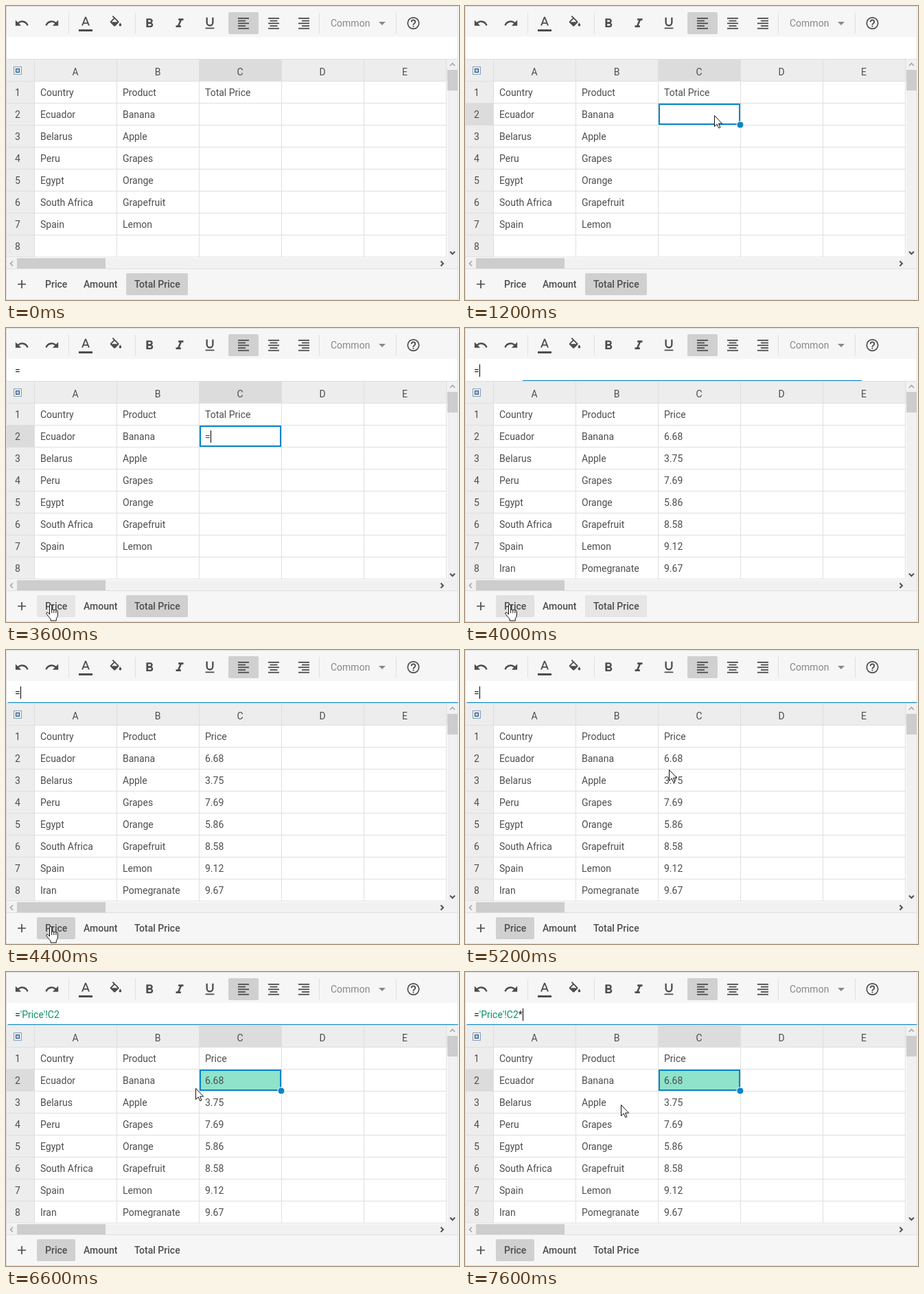
Recreate the animation shown at these times as an HTML page. Size 660 by 428 pixels, loop 8 s.

```html
<!DOCTYPE html>
<html lang="en">
<head>
<meta charset="utf-8">
<title>Spreadsheet cross reference</title>
<style>
  html, body { margin: 0; width: 660px; height: 428px; overflow: hidden; background: #fff; }
  svg { display: block; font: 14px Roboto, sans-serif; fill: #4d4d4d; white-space: pre; }
  .mid { text-anchor: middle; }
  .tab { font-weight: 500; }
</style>
</head>
<body>
<svg id="stage" width="660" height="428" viewBox="0 0 660 428"></svg>
<script>
const LOOP = 8000, STEP = 200;
const BLUE = '#0a85c7', LINE = '#dfdfdf', BAR = '#f6f6f6', HEAD = '#ededed', ACTIVE = '#d0d0d0', HOVER = '#e6e6e6';
const stage = document.getElementById('stage');

const rect = (x, y, w, h, fill, extra = '') => `<rect x="${x}" y="${y}" width="${w}" height="${h}" fill="${fill}" ${extra}/>`;
const text = (x, y, s, extra = '') => `<text x="${x}" y="${y}" ${extra}>${s}</text>`;
const stroke = (d, color, width = 2) => `<path d="${d}" fill="none" stroke="${color}" stroke-width="${width}"/>`;
const icon = (cx, cy, d) => `<path transform="translate(${cx - 11} ${cy - 11}) scale(.917)" d="${d}"/>`;

const undo = 'M12.5 8C9.85 8 7.45 9 5.6 10.6L2 7V16H11L7.38 12.38C8.77 11.22 10.54 10.5 12.5 10.5C16.04 10.5 19.05 12.81 20.1 16L22.47 15.22C21.08 11.03 17.15 8 12.5 8Z';
const letterA = 'M9.62 12L12 5.67L14.37 12M11 3L5.5 17H7.75L8.87 14H15.12L16.25 17H18.5L13 3Z';
const bucket = 'M19 11.5C19 11.5 17 13.67 17 15A2 2 0 0 0 21 15C21 13.67 19 11.5 19 11.5M5.21 10L10 5.21L14.79 10M16.56 8.94L7.62 0L6.21 1.41L8.59 3.79L3.44 8.94Q2.4 10 3.44 11.06L8.94 16.56Q10 17.4 11.06 16.56L16.56 11.06Q17.6 10 16.56 8.94Z';
const bold = 'M13.5 15.5H10V12.5H13.5A1.5 1.5 0 0 1 13.5 15.5M10 6.5H13A1.5 1.5 0 0 1 13 9.5H10M15.6 10.79C16.57 10.11 17.25 9 17.25 8C17.25 5.74 15.5 4 13.25 4H7V18H14.04C16.14 18 17.75 16.3 17.75 14.21C17.75 12.69 16.89 11.39 15.6 10.79Z';
const italic = 'M10 4V7H12.21L8.79 15H6V18H14V15H11.79L15.21 7H18V4Z';
const underline = 'M5 21H19V19H5ZM12 17A6 6 0 0 0 18 11V3H15.5V11A3.5 3.5 0 0 1 8.5 11V3H6V11A6 6 0 0 0 12 17Z';
const help = 'M11 18H13V16H11ZM12 6A4 4 0 0 0 8 10H10A2 2 0 0 1 14 10C14 12 11 11.75 11 15H13C13 12.75 16 12.5 16 10A4 4 0 0 0 12 6Z';
const arrow = 'M.5 .5V16.5L4.2 13L6.8 18.7L9 17.7L6.6 12.2H11.6Z';
const hand = 'M5.5 15V2.2a1.6 1.6 0 0 1 3.2 0V9q0-1.4 1.5-1.4t1.6 1.6q.1-1.2 1.5-1.2t1.6 1.7q.2-1 1.2-1t1.2 1.6V16q0 3-2 5.2V24H7V21.5Q4.5 19 1 14.2Q.2 12.6 1.7 12T5.5 15Z';

const countries = ['Country', 'Ecuador', 'Belarus', 'Peru', 'Egypt', 'South Africa', 'Spain', 'Iran'];
const products = ['Product', 'Banana', 'Apple', 'Grapes', 'Orange', 'Grapefruit', 'Lemon', 'Pomegranate'];
const prices = ['Price', '6.68', '3.75', '7.69', '5.86', '8.58', '9.12', '9.67'];

// Pointer path: time, x, y
const path = [
  [200, 300, 334], [400, 372, 262], [600, 369, 185], [800, 363, 159], [2400, 363, 159],
  [2800, 300, 230], [3200, 100, 380], [3400, 65, 402], [4400, 65, 402], [4600, 110, 331],
  [4800, 190, 265], [5200, 297, 174], [5400, 307, 163], [5800, 312, 151], [6200, 312, 151],
  [7000, 240, 187], [7400, 227, 193], [LOOP, 227, 193]
];

function pointer(t) {
  if (t < path[0][0]) return '';
  const i = path.findIndex(p => p[0] > t);
  const [t0, x0, y0] = path[i - 1], [t1, x1, y1] = path[i];
  const k = (t - t0) / (t1 - t0);
  const overTab = t >= 3400 && t <= 4400;
  const x = Math.round(x0 + (x1 - x0) * k) - (overTab ? 7 : 0), y = Math.round(y0 + (y1 - y0) * k);
  return `<path transform="translate(${x} ${y})" d="${overTab ? hand : arrow}" fill="#fff" stroke="#111"/>`
    + (overTab ? `<g transform="translate(${x} ${y})">${stroke('M8.7 9V13M11.8 9V13M14.9 10V13', '#111', 1)}</g>` : '');
}

const caret = (x, y, t, since) => (t - since) % 1000 < 500 ? rect(x, y, 1, 18, '#000') : '';

function toolbar() {
  let s = rect(0, 0, 659, 45, BAR) + rect(324, 9, 44, 32, ACTIVE, 'rx="2"');
  for (const x of [91, 188, 456, 568]) s += rect(x, 10, 1, 30, LINE);
  s += icon(23, 25, undo) + `<g transform="matrix(-1 0 0 1 90 0)">${icon(23, 25, undo)}</g>`;
  s += icon(116, 24, letterA) + rect(106, 34, 20, 3, '#4d4d4d') + icon(160, 25, bucket);
  s += icon(209, 25.5, bold) + icon(253, 25.5, italic) + icon(297, 25, underline);
  [0, .5, 1].forEach((side, n) => {
    for (let i = 0; i < 5; i++) {
      const w = i % 2 ? 11 : 16;
      s += rect(338 + n * 44 + (16 - w) * side, 17 + i * 3.7, w, 1.8, '#4d4d4d');
    }
  });
  s += text(473, 30, 'Common', 'fill="#888"') + '<path d="M543 23h10l-5 5z" fill="#888"/>';
  return s + '<circle cx="593.5" cy="25" r="8.2" fill="none" stroke="#4d4d4d" stroke-width="1.7"/>' + icon(593.5, 25, help);
}

function grid(onPrice, colSelected, rowSelected) {
  let s = rect(1, 78, 642, 31, HEAD) + rect(1, 109, 40, 257, HEAD);
  if (colSelected) s += rect(282, 78, 119, 31, '#dcdcdc');
  if (rowSelected) s += rect(1, 142, 40, 31, '#dcdcdc');
  for (let c = 0; c < 6; c++) s += rect(41 + c * 120, 78, 1, 288, LINE);
  for (let r = 0; r < 9; r++) s += rect(1, 109 + r * 32, 641, 1, LINE);
  [...'ABCDE'].forEach((l, c) => s += text(101 + c * 120, 101, l, 'class="mid"'));
  for (let r = 0; r < 8; r++) {
    const y = 131 + r * 32;
    s += text(17, y, r + 1, 'class="mid"');
    if (r < 7 || onPrice) s += text(50, y, countries[r]) + text(170, y, products[r]);
    if (onPrice) s += text(290, y, prices[r]);
  }
  if (!onPrice) s += text(290, 131, 'Total Price');
  return s + rect(11.5, 88.5, 11, 11, 'none', 'stroke="#24507f" stroke-dasharray="1 1"')
    + rect(14.5, 91.5, 5, 5, '#a9c6e6', 'stroke="#24507f"');
}

function scrollbars() {
  return rect(643, 78, 15, 289, '#f1f1f1') + rect(643, 93, 15, 30, '#cdcdcd')
    + rect(1, 367, 657, 15, '#f1f1f1') + rect(16, 367, 129, 15, '#cdcdcd')
    + stroke('M647 87l3.5-3.5l3.5 3.5M10 371.5l-3.5 3.5l3.5 3.5', '#a8a8a8', 1.7)
    + stroke('M647 357.5l3.5 3.5l3.5-3.5M633.5 371.5l3.5 3.5l-3.5 3.5', '#505050', 2);
}

function tabs(t) {
  const price = t < 3400 ? BAR : t < 4000 ? HOVER : t < 4200 ? '#e1e1e1' : ACTIVE;
  const total = t < 4000 ? ACTIVE : t < 4200 ? HOVER : BAR;
  return rect(0, 382, 659, 46, BAR) + rect(1, 382, 658, 1, LINE)
    + rect(45, 389, 56, 32, price, 'rx="2"') + rect(175, 389, 90, 32, total, 'rx="2"')
    + stroke('M17 405H29M23 399V411', '#4d4d4d', 1.7)
    + text(57, 410, 'Price', 'class="tab"') + text(113, 410, 'Amount', 'class="tab"') + text(187, 410, 'Total Price', 'class="tab"');
}

function formulaBar(t) {
  let s = rect(1, 77, 657, 1, LINE);
  if (t >= 2400) {
    const ref = t >= 6000 ? `<tspan fill="#0b8f62">'Price'!C2</tspan>` : '';
    s += text(13, 67, '=' + ref + (t >= 7400 ? '*' : ''), 'fill="#222"');
  }
  if (t >= 4000) {
    const w = t < 4200 ? 494 : 657;
    s += rect(331 - w / 2, 76, w, 1, BLUE);
    const [x, since] = t >= 7400 ? [84, 7400] : t >= 6000 ? [78, 6000] : [21, 4000];
    s += caret(x, 53, t, since);
  }
  return s;
}

function selection(t) {
  const editing = t >= 2400 && t < 4000, picked = t >= 6000;
  if (t < 1200 || (t >= 4000 && !picked)) return '';
  let s = rect(283, 143, 117, 29, picked ? '#8fe3cb' : '#fff', `stroke="${BLUE}" stroke-width="2"`);
  if (picked) s += text(290, 163, prices[1]);
  return s + (editing
    ? text(290, 163, '=') + caret(298, 149, t, 2400)
    : `<circle cx="401" cy="173" r="5" fill="${BLUE}" stroke="#fff"/>`);
}

function draw(t) {
  const onPrice = t >= 4000, picked = t >= 6000;
  stage.innerHTML = toolbar()
    + grid(onPrice, !onPrice || picked, (t >= 1200 && !onPrice) || picked)
    + selection(t) + formulaBar(t) + scrollbars() + tabs(t)
    + rect(.5, .5, 658, 427, 'none', `stroke="${LINE}"`)
    + pointer(t);
}

let start, last;
function frame(now) {
  start ??= now;
  const t = Math.floor((now - start) % LOOP / STEP) * STEP;
  if (t !== last) draw(last = t);
  requestAnimationFrame(frame);
}
draw(0);
requestAnimationFrame(frame);
</script>
</body>
</html>
```
